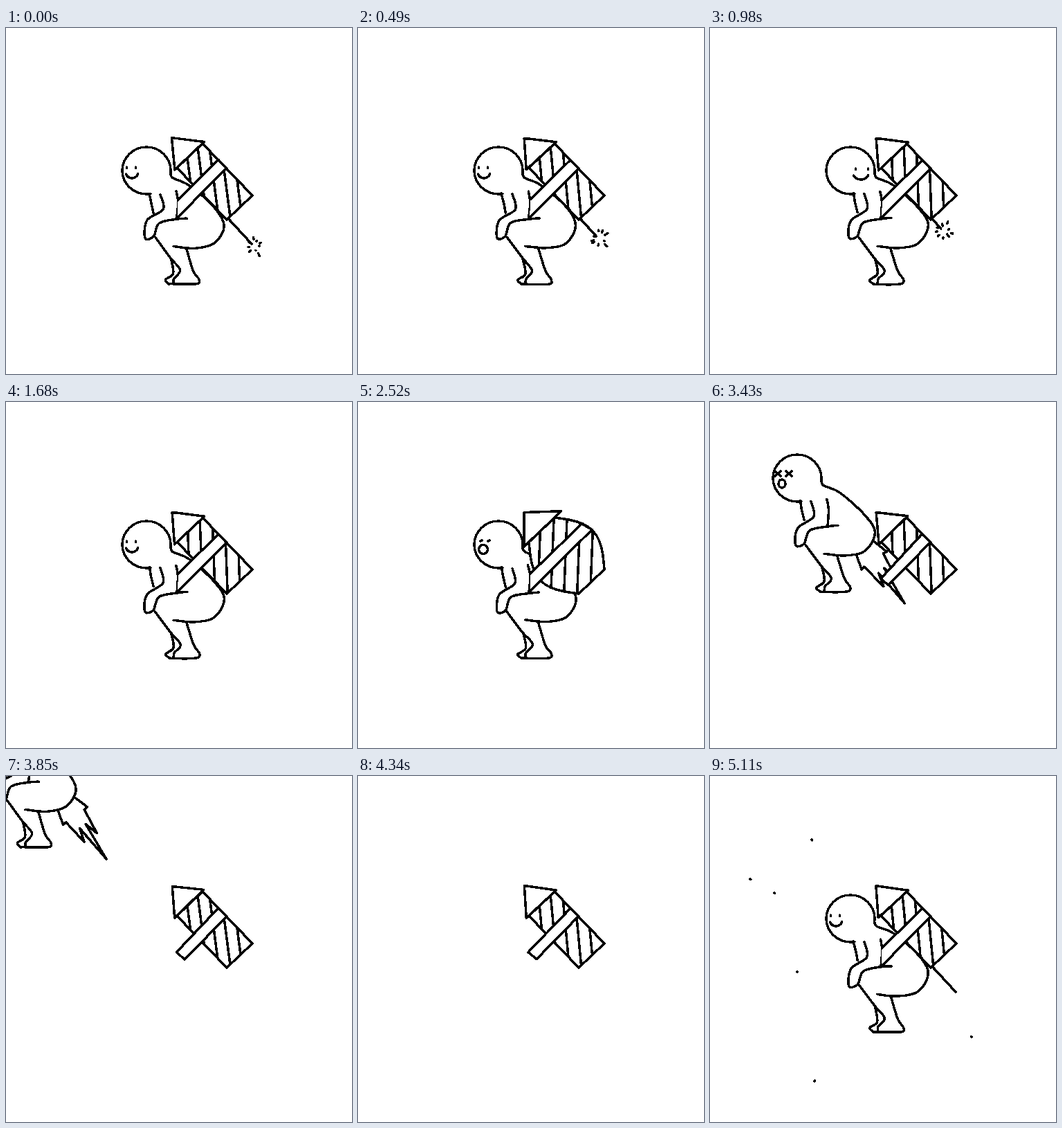
An HTML page with a canvas for the animation above (5.18 s loop, 500x500 px).

```html
<!DOCTYPE html>
<html lang="en">
<head>
<meta charset="utf-8">
<title>Rocket backpack</title>
<style>
  html, body { margin: 0; height: 100%; overflow: hidden; background: #fff; }
  canvas { display: block; width: 100%; height: 100%; image-rendering: pixelated; }
</style>
</head>
<body>
<canvas id="stage" width="500" height="500"></canvas>
<script>
const ctx = document.getElementById('stage').getContext('2d', { willReadFrequently: true });
const STEP = 70, FRAMES = 74, POSES = 5;
const GASP = 2310, IGNITE = 2660, LAUNCH = 2800, RETURN = 4620;

const clamp = (v) => Math.max(0, Math.min(1, v));
const ramp = (t, from, to) => clamp((t - from) / (to - from));
const ease = (p) => p * p * (3 - 2 * p);
const hash = (n) => { const s = Math.sin(n * 12.9898) * 43758.5453; return s - Math.floor(s); };
const range = (n, f) => Array.from({ length: n }, (_, i) => f(i));

// Line boil: each pose reseeds the same small offsets
let seed = 0;
const wobble = (points) => points.map((p) => p.map((v) => v + (hash(++seed) - 0.5) * 1.2));

function trace(points) {
  ctx.beginPath();
  points.forEach((p) => ctx.lineTo(...p));
}

function line(...points) {
  trace(points);
  ctx.stroke();
}

function shape(points) {
  trace(points);
  ctx.closePath();
  ctx.fill();
  ctx.stroke();
}

function arc(x, y, rx, ry, from = 0, to = 2 * Math.PI, reverse = false) {
  ctx.beginPath();
  ctx.ellipse(x, y, rx, ry, 0, from, to, reverse);
  ctx.stroke();
}

// Smooth stroke through all points (Catmull-Rom)
function curve(...points) {
  const p = wobble(points), last = p.length - 1;
  const at = (i) => p[Math.max(0, Math.min(last, i))];
  const handle = (from, a, b) => from.map((v, k) => v + (b[k] - a[k]) / 6);
  ctx.beginPath();
  ctx.moveTo(...p[0]);
  for (let i = 0; i < last; i++) {
    const c1 = handle(at(i), at(i - 1), at(i + 1));
    const c2 = handle(at(i + 1), at(i + 2), at(i));
    ctx.bezierCurveTo(...c1, ...c2, ...at(i + 1));
  }
  ctx.stroke();
}

function drawFace(t) {
  const eyes = (x, gap, draw) => [x, x + gap].forEach(draw);
  if (t >= IGNITE && t < RETURN) {
    eyes(175, 16, (x) => {
      line([x - 4, 196], [x + 4, 203]);
      line([x + 4, 196], [x - 4, 203]);
    });
    arc(181, 214, 5, 6);
  } else if (t >= GASP && t < RETURN) {
    eyes(178, 11, (x) => line([x - 1, 201], [x + 1, 200]));
    arc(181, 213, 6.5, 6.5);
  } else {
    const turn = ease(ramp(t, 560, 840)) - ease(ramp(t, 1330, 1610));
    const x = 36 * turn, y = 2 * turn;
    eyes(174.5 + x, 13 + 5 * turn, (eye) => line([eye, 201 + y], [eye, 202.5 + y]));
    arc(182 + x, 208 + y, 9 + 2 * turn, 9, 0.3, 2.8);
  }
}

function drawBody(t) {
  const hip = [242, 315], wrist = [247, 276], toe = [236, 370];
  arc(203, 206, 35, 34, 0, 1.4, true);                                               // head
  curve([238, 205], [240, 216], [264, 227], [300, 258], [315, 285], [301, 311], [272, 318], hip);
  curve([207, 239], [210, 252], [213, 267]);                                         // chest
  curve([246, 236], [249, 252], wrist);
  curve([223, 240], [227, 262], [204, 278], [201, 303], [213, 301], [221, 282], wrist, [262, 275]);
  curve([215, 302], [237, 332], [252, 350], [243, 362], [242, 369]);                 // legs
  curve([238, 333], [242, 355], [231, 364], toe);
  curve([261, 318], [271, 351], [279, 363], [275, 370], toe);
  drawFace(t);
}

// Five spikes, longest in the middle, with shorter notches between them
function drawFlame(frame) {
  const size = 97 * (1 + 0.17 * Math.sin((frame - 49) * 2.1));
  const spikes = range(9, (i) => {
    const across = (i - 4) * 5.5, notch = i % 2 ? 0.5 : 1;
    return [size * notch * (1 - Math.abs(across) / 28), across];
  });
  ctx.save();
  ctx.translate(302, 308);
  ctx.rotate(0.95);
  line(...wobble([[0, -16], ...spikes, [0, 16]].map(([x, y]) => [x, -y])));
  ctx.restore();
}

function drawRocket(swell, slant, loose) {
  // u runs from nose to tail, v from the upper side to the lower side
  const at = (u, v) => {
    const w = 0.5 + (v - 0.5) * (1 + 1.05 * swell * Math.sin(Math.PI * u));
    return [284 + 72 * u - 37 * w, 167 + 75 * u + 35 * w];
  };
  const side = range(13, (i) => i / 12);
  shape([...side.map((u) => at(u, 0)), ...side.reverse().map((u) => at(u, 1))]);

  ctx.save();
  ctx.clip();
  const slope = (0.03 + 0.1 * slant) * (1 - swell) - 0.04 * swell;
  for (let i = 0; i < 5; i++) {
    const x = 263 + 18.5 * i, lean = slope * 60, y = 195 + 12 * i;
    line([x - lean, y - 60], [x + lean, y + 60]);
  }
  ctx.restore();

  shape(wobble([[240, 159], at(0, -0.06 - 0.22 * swell), at(0, 1.09 + 0.1 * swell)]));

  const [near, far] = loose ? [[246, 255], [258, 265]] : [[249, 248], [248, 274]];
  const strap = wobble([near, at(0.32, 0), at(0.48, 0), far]);
  if (loose) return shape(strap);
  trace(strap);
  ctx.fill();
  line(...strap);
}

function drawFuse(t, frame) {
  const lit = t < RETURN, burnt = lit ? t / 1610 : 0;
  if (burnt >= 1) return;
  const x = 355 - 35 * burnt, y = 312 - 36 * burnt;
  line([318, 272], [x, y]);
  if (!lit) return;
  for (let i = 0; i < 9; i++) {
    const angle = i * 0.7 + hash(frame * 17 + i) * 0.5;
    const from = 6 + 6 * hash(frame * 31 + i), to = from + 5 * hash(frame * 43 + i);
    line(...[from, to].map((r) => [x + 5 + r * Math.cos(angle), y + 3 + r * Math.sin(angle)]));
  }
}

function drawBurst(t) {
  const center = [232, 268], p = ramp(t, RETURN - STEP, 5110), out = 1 - (1 - p) ** 3;
  const lasting = [[147, 92], [58, 149], [93, 169], [126, 283], [378, 377], [151, 441]];
  const fading = range(10, (i) => {
    const r = 90 + 45 * hash(i + 5);
    return [232 + r * Math.cos(i * 2.4), 268 + r * Math.sin(i * 2.4)];
  }).filter((_, i) => p < 0.5 + 0.045 * i);
  const along = (end, q) => center.map((c, k) => c + (end[k] - c) * q);
  for (const end of [...lasting, ...fading]) {
    line(along(end, out), along(end, out - 0.12 * (1 - p) - 0.005));
  }
}

// Hard black and white pixels, as from a pencil tool
function sharpen() {
  const image = ctx.getImageData(0, 0, 500, 500), d = image.data;
  for (let i = 0; i < d.length; i += 4) d[i] = d[i + 1] = d[i + 2] = d[i] < 128 ? 0 : 255;
  ctx.putImageData(image, 0, 0);
}

function draw(frame) {
  const t = frame * STEP, pose = frame % POSES;
  const flying = t >= LAUNCH && t < RETURN;
  const n = flying ? (t - LAUNCH) / STEP : 0;
  seed = pose * 1000;

  ctx.fillStyle = '#fff';
  ctx.fillRect(0, 0, 500, 500);
  ctx.strokeStyle = '#000';
  ctx.lineWidth = 3.5;
  ctx.lineCap = ctx.lineJoin = 'round';

  ctx.save();
  ctx.translate(Math.round(-0.95 * n * n), Math.round(-1.185 * n * n));
  drawBody(t);
  if (t >= IGNITE && t < RETURN) drawFlame(frame);
  ctx.restore();

  drawFuse(t, frame);
  const swell = ease(ramp(t, 2240, 2520)) - ease(ramp(t, IGNITE - STEP, IGNITE + STEP));
  drawRocket(swell, 0.5 + 0.5 * Math.cos(pose * 2.5), flying);
  if (t >= RETURN) drawBurst(t);
  sharpen();
}

const start = performance.now();
let shown = -1;
function tick() {
  const frame = Math.floor((performance.now() - start) / STEP) % FRAMES;
  if (frame !== shown) draw(shown = frame);
  requestAnimationFrame(tick);
}
tick();
</script>
</body>
</html>
```
